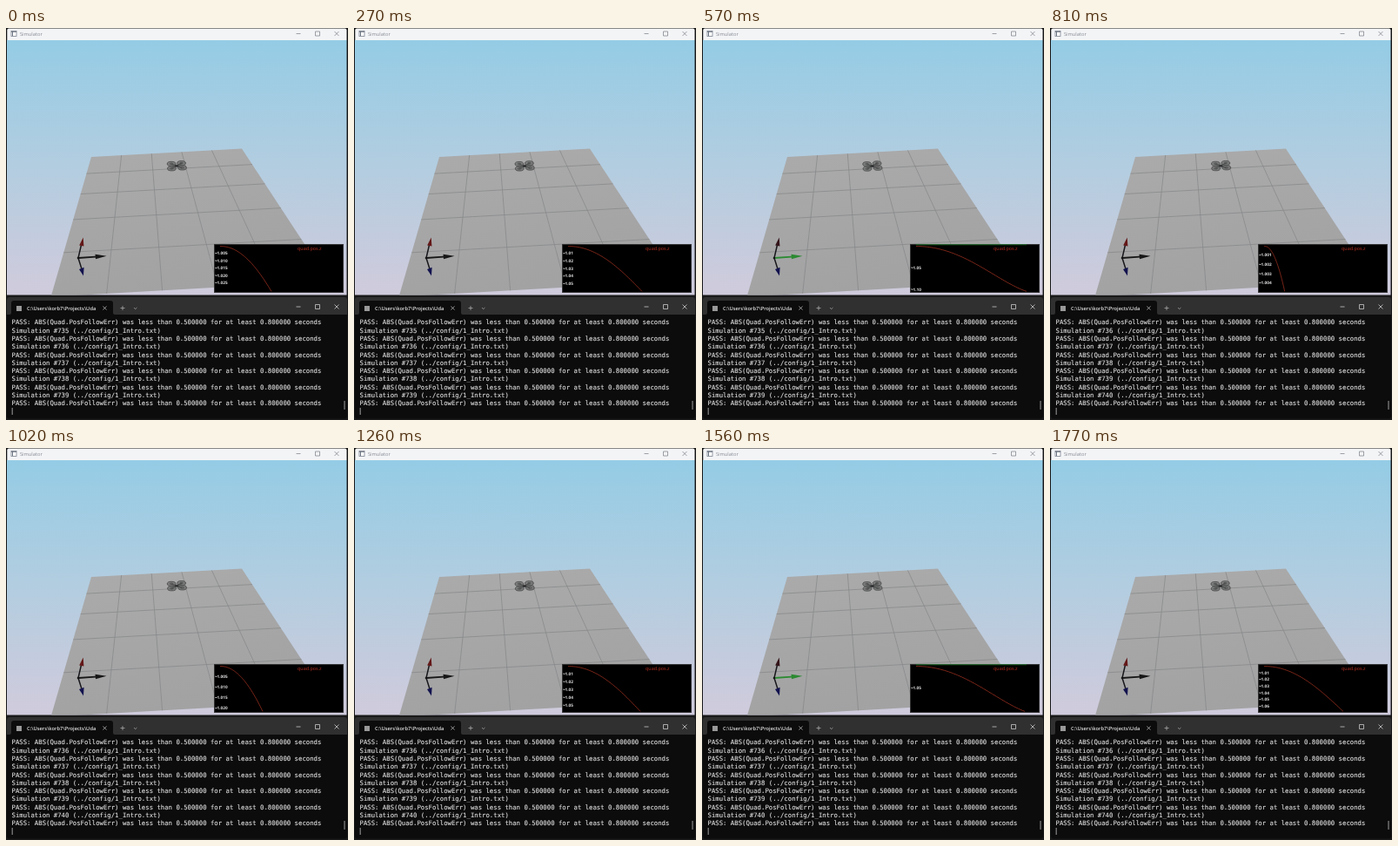
An HTML page for the animation above (1800 ms loop, 393 by 450 pixels).

```html
<!DOCTYPE html>
<html lang="en">
<head>
<meta charset="utf-8">
<title>Simulator</title>
<style>
html, body { margin: 0; width: 100%; height: 100%; overflow: hidden; background: #191919; }
svg { display: block; width: 393px; height: 450px; }
text { text-rendering: geometricPrecision; white-space: pre; }
.ui { font-family: "Open Sans", "Noto Sans", sans-serif; }
.log { font: 7.3px "DejaVu Sans Mono", "Noto Sans Mono", monospace; fill: #dedede; stroke: #dedede; stroke-width: .12; }
.tick { font: 600 4.7px "Noto Sans", sans-serif; fill: #e6e6e6; }
.line { fill: none; stroke-width: .7; }
</style>
</head>
<body>
<svg viewBox="0 0 393 450" xmlns="http://www.w3.org/2000/svg">
  <defs>
    <linearGradient id="sky" x1="0" y1="0" x2="0" y2="1">
      <stop offset="0" stop-color="#94cce5"/>
      <stop offset=".5" stop-color="#b3cde0"/>
      <stop offset="1" stop-color="#d0cbdc"/>
    </linearGradient>
    <linearGradient id="slab" x1="0" y1="0" x2=".3" y2="1">
      <stop offset="0" stop-color="#ababab"/>
      <stop offset="1" stop-color="#a2a2a3"/>
    </linearGradient>
    <clipPath id="view"><rect x="1" y="14" width="390.5" height="292.5"/></clipPath>
    <g id="controls" class="line">
      <path d="M333.5 0h5M355.5-2.5h5v5h-5zM377.5-2.5l5 5m0-5l-5 5"/>
    </g>
  </defs>

  <rect width="393" height="450" fill="#191919"/>

  <!-- simulator window -->
  <path d="M1.3 14V2.6q0-2 2-2H389.5q2 0 2 2V14z" fill="#f3f4f6"/>
  <rect x="6" y="3.5" width="6" height="6" fill="#fff" stroke="#7b8290" stroke-width=".8"/>
  <path d="M6 4.3h6M7.5 4v5" stroke="#6d7583"/>
  <text class="ui" x="16" y="8.7" font-size="5.7" fill="#858994">Simulator</text>
  <use href="#controls" y="6.5" stroke="#777b83"/>
  <g clip-path="url(#view)">
    <rect x="1" y="13" width="391" height="294" fill="url(#sky)"/>
    <path id="floor" fill="url(#slab)"/>
    <path id="grid" class="line" stroke="#858687"/>
    <g id="drone" fill="none" stroke="#484949">
      <path d="M190.5 156l12 4.5M190.5 161l12-6" stroke-width="1.3"/>
      <g id="rotors" stroke-width=".8"></g>
      <ellipse cx="196.5" cy="158.2" rx="2.3" ry="1.5" fill="#333435" stroke="none"/>
    </g>
    <g stroke-width="1.5" stroke="#18181c">
      <path d="M83 264L86.5 249M83 264L86.8 276"/>
      <path id="upHead" d="M84.2 249.5L88.7 240.5L89.4 250.5z" stroke="none"/>
      <path d="M84 277L89.6 274.8L89 284.5z" fill="#12124e" stroke="none"/>
      <g id="forward">
        <path d="M83 264L103 262.6" stroke-width="1.8"/>
        <path d="M102.5 259.7L115.5 261.8L103 265.2z" stroke="none"/>
      </g>
      <circle cx="83" cy="264" r="1.3" stroke="none" fill="#151515"/>
    </g>
  </g>

  <!-- altitude chart -->
  <rect x="239.3" y="248.3" width="148.4" height="55.4" fill="#000" stroke="#333" stroke-width=".6"/>
  <path id="passBar" d="M246 248.8H373" class="line" stroke="#1d8f2b"/>
  <path id="curve" class="line" stroke="#ad3623"/>
  <g id="ticks"></g>
  <text x="335" y="254.8" font-family="Noto Sans, sans-serif" font-size="5.4" font-weight="500" fill="#ad2f20">quad.pos.z</text>

  <!-- terminal window -->
  <rect x="1" y="309" width="391" height="139.5" rx="3" fill="#0c0c0c"/>
  <path d="M1 329V312q0-3 3-3H389q3 0 3 3V329z" fill="#303030"/>
  <path d="M4 329q2 0 2-2V316q0-3 3-3H120q3 0 3 3V327q0 2 2 2z" fill="#0c0c0c"/>
  <rect x="12" y="319" width="6" height="6" fill="#999"/>
  <text class="ui" x="24" y="324" font-size="5.75" font-weight="600" fill="#e2e2e2" id="tab"></text>
  <path class="line" stroke="#d6d6d6" d="M111.5 319.5l4 4m0-4l-4 4"/>
  <path class="line" stroke="#b5b5b5" d="M131.5 321.5h5m-2.5-2.5v5M147 321l1.7 1.7l1.7-1.7"/>
  <use href="#controls" y="320" stroke="#dedede"/>
  <g id="log" class="log"></g>
  <path d="M7.2 436v8M389 428v10" stroke="#c4c4c4" stroke-width=".8"/>
</svg>

<script>
const LOOP = 1800, STEP = 30;
const START = 247, TOP = 250.6, BOTTOM = 302.4, RESET = 630;
// [time, x of the curve's end]; equal times mark a hard change
const PROGRESS = [
  [0, 305], [60, 307], [270, 331], [570, 373], [RESET, 381],
  [RESET, 248], [1020, 295], [1260, 329], [1560, 371], [1650, 383],
  [1710, 383], [1710, 329], [1770, 337], [LOOP, 337]
];
// Floor corners: back left, back right, front right, front left
const FLOOR = [[98, 148], [271, 138.5], [371, 290.5], [51.6, 308.5]];
const NS = "http://www.w3.org/2000/svg";
const $ = id => document.getElementById(id);

function add(parent, tag, attrs, content = "") {
  const node = document.createElementNS(NS, tag);
  for (const key in attrs) node.setAttribute(key, attrs[key]);
  node.textContent = content;
  parent.append(node);
  return node;
}

// Perspective map from the unit square to four corners
function perspective([a, b, c, d]) {
  const sum = i => a[i] - b[i] + c[i] - d[i];
  const p = i => b[i] - c[i], q = i => d[i] - c[i];
  const det = p(0) * q(1) - q(0) * p(1);
  const g = (sum(0) * q(1) - q(0) * sum(1)) / det;
  const h = (p(0) * sum(1) - sum(0) * p(1)) / det;
  return (u, v) => [0, 1].map(i =>
    (a[i] + (b[i] - a[i] + g * b[i]) * u + (d[i] - a[i] + h * d[i]) * v) / (1 + g * u + h * v)
  ).join(" ");
}

function buildScene() {
  const at = perspective(FLOOR);
  $("floor").setAttribute("d", "M" + FLOOR.join("L") + "z");
  let lines = "";
  for (let i = 1; i < 5; i++) {
    const k = i / 5;
    lines += `M${at(k, 0)}L${at(k, 1)}M${at(0, k)}L${at(1, k)}`;
  }
  $("grid").setAttribute("d", lines);

  for (const [cx, cy] of [[190.5, 155.8], [202, 155], [190.8, 161.2], [203, 160.3]]) {
    add($("rotors"), "ellipse", { cx, cy, rx: 4.9, ry: 2.6, fill: "#5558" });
    add($("rotors"), "ellipse", { cx, cy, rx: 1.8, ry: .8 });
  }
  $("tab").textContent = "C:\\Users\\korb7\\Projects\\Uda";
}

function endAt(t) {
  for (let i = 1; i < PROGRESS.length; i++) {
    const [t0, x0] = PROGRESS[i - 1], [t1, x1] = PROGRESS[i];
    if (t < t1) return x0 + (x1 - x0) * (t - t0) / (t1 - t0);
  }
}

// Free fall that is gradually braked
function drop(x) {
  const p = Math.max(0, x - START);
  return 9.5e-6 * p * p - .0468 * (p / 126) ** 4.6;
}

function drawChart(end) {
  const depth = drop(end), scale = (BOTTOM - TOP) / depth;
  const points = [];
  for (let i = 0; i <= 50; i++) {
    const x = START - 1 + (end - START + 1) * i / 50;
    points.push(x.toFixed(2) + " " + (TOP + drop(x) * scale).toFixed(2));
  }
  $("curve").setAttribute("d", "M" + points.join("L"));

  const step = [.0001, .0005, .001, .005, .01, .05].find(s => depth / s < 7);
  const digits = Math.ceil(-Math.log10(step));
  $("ticks").replaceChildren();
  // Labels that would run out of the chart are left off
  for (let i = 1; i * step * scale < BOTTOM - TOP - 2; i++) {
    const y = TOP + i * step * scale - .5;
    add($("ticks"), "path", { d: `M240 ${y}h2.5`, stroke: "#ddd", "stroke-width": .6 });
    add($("ticks"), "text", { x: 241, y: y + 1.7, class: "tick" }, (-1 - i * step).toFixed(digits));
  }
}

let lastRun;
function drawLog(run) {
  if (run === lastRun) return;
  lastRun = run;
  $("log").replaceChildren();
  for (let i = 0; i < 11; i++) {
    const line = i % 2
      ? `Simulation #${run - 4 + (i - 1) / 2} (../config/1_Intro.txt)`
      : "PASS: ABS(Quad.PosFollowErr) was less than 0.500000 for at least 0.800000 seconds";
    add($("log"), "text", { x: 6.5, y: 340.3 + i * 9.31 }, line);
  }
}

function draw(t) {
  const end = endAt(t), passed = end >= 360;
  const forward = passed ? "#2c8a32" : "#171717";
  drawChart(end);
  drawLog(t < RESET ? 739 : 740);
  $("passBar").setAttribute("visibility", passed ? "visible" : "hidden");
  $("forward").setAttribute("fill", forward);
  $("forward").setAttribute("stroke", forward);
  $("upHead").setAttribute("fill", passed ? "#35151a" : "#641818");
  $("drone").setAttribute("transform", `translate(${-(end - START) / 140} ${drop(end) * 4})`);
}

let lastStep;
function frame() {
  const t = Math.floor(performance.now() % LOOP / STEP) * STEP;
  if (t !== lastStep) draw(lastStep = t);
  requestAnimationFrame(frame);
}

buildScene();
frame();
</script>
</body>
</html>
```
